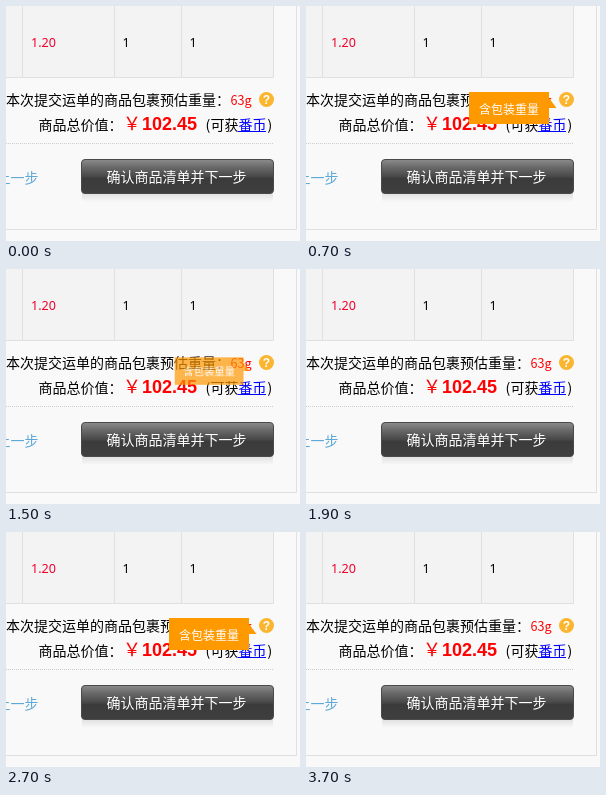
An HTML page that plays this animation: 294 by 235 pixels, repeating every 4600 ms.

```html
<!DOCTYPE html>
<html lang="zh-CN">
<head>
<meta charset="utf-8">
<title>包裹重量提示</title>
<style>
  html, body { margin: 0; width: 100%; height: 100%; overflow: hidden; background: #f9f9f9; }
  svg { display: block; width: 294px; height: 235px; }
  text { font: 350 14px "Noto Sans CJK SC", "Noto Sans CJK", sans-serif; white-space: pre; }
  .cell { font: 12.6px "Noto Sans", sans-serif; }
  .weight { font-size: 12.6px; }
  .yen { font-size: 18px; font-weight: 400; }
  .price { font: bold 18px "Liberation Sans", sans-serif; }
  .mark { font: bold 12px "Liberation Sans", sans-serif; }
  .small { font-size: 12px; }
  .rule { fill: none; stroke: #e0e0e0; }
  .red { fill: #f00; }
  .white { fill: #fff; }

  /* Three short hovers and one longer one; the tip pops in and vanishes at once. */
  .tip {
    transform-origin: 204px 102.5px;
    animation: tip 4600ms step-end infinite;
  }
  @keyframes tip {
    0%, 21.735%, 41.3%, 63.04%, 80.43%, 100% { opacity: 0; transform: scale(.6); }
    10.865% { opacity: .6; transform: scale(.8); }
    32.605%, 71.735% { opacity: .7; transform: scale(.86); }
    54.345% { opacity: .4; transform: scale(.7); }
    13.04%, 34.78%, 56.52%, 73.91% { opacity: .93; transform: scale(.97); }
    15.215%, 36.955%, 58.69%, 60.865%, 76.085% { opacity: 1; transform: none; }
  }
</style>
</head>
<body>
<svg viewBox="0 0 294 235">
  <defs>
    <linearGradient id="face" x2="0" y2="1">
      <stop offset="0" stop-color="#8c8c8c"/>
      <stop offset=".25" stop-color="#666"/>
      <stop offset=".5" stop-color="#484848"/>
      <stop offset=".56" stop-color="#3b3b3b"/>
      <stop offset="1" stop-color="#3f3f3f"/>
    </linearGradient>
    <linearGradient id="shade" x2="0" y2="1">
      <stop offset="0" stop-color="#dcdcdc"/>
      <stop offset="1" stop-color="#f9f9f9"/>
    </linearGradient>
  </defs>

  <rect width="294" height="235" fill="#f9f9f9"/>
  <path class="rule" d="M290.5 0V223.5H0"/>

  <rect width="268" height="71" fill="#f3f3f3"/>
  <path class="rule" d="M16.5 0V71M108.5 0V71M175.5 0V71M267.5 0V71.5H0"/>
  <text class="cell" x="25" y="41" fill="#f0002c">1.20</text>
  <text class="cell" x="116.5" y="41">1</text>
  <text class="cell" x="183.5" y="41">1</text>

  <text x="0" y="99">本次提交运单的商品包裹预估重量：</text>
  <text class="weight red" x="224.5" y="99">63g</text>
  <circle cx="260.5" cy="93.5" r="7.5" fill="#fbb52f"/>
  <text class="mark white" x="260.5" y="98" text-anchor="middle">?</text>

  <text x="32.5" y="124">商品总价值：</text>
  <text class="yen red" x="117" y="124">￥</text>
  <text class="price red" x="136" y="124">102.45</text>
  <text x="199.5" y="124">(</text>
  <text x="204.5" y="124">可获</text>
  <text x="232.5" y="124" fill="#00f">番币</text>
  <path d="M232 125.5H260" stroke="#00f"/>
  <text x="261.5" y="124">)</text>
  <path d="M0 137.5H268" stroke="#ccc" stroke-dasharray="1 1"/>

  <text x="-9.5" y="177" fill="#5fa9d6">上一步</text>
  <rect x="76" y="186" width="191" height="10" fill="url(#shade)"/>
  <rect x="75.5" y="153.5" width="192" height="34" rx="3.5" fill="url(#face)" stroke="#4a4a4a"/>
  <text class="white" x="100.5" y="176">确认商品清单并下一步</text>

  <g class="tip">
    <path d="M163 86H243V92L250.5 102H243V118H163Z" fill="#f90"/>
    <text class="small white" x="173" y="107.5">含包装重量</text>
  </g>
</svg>
</body>
</html>
```
